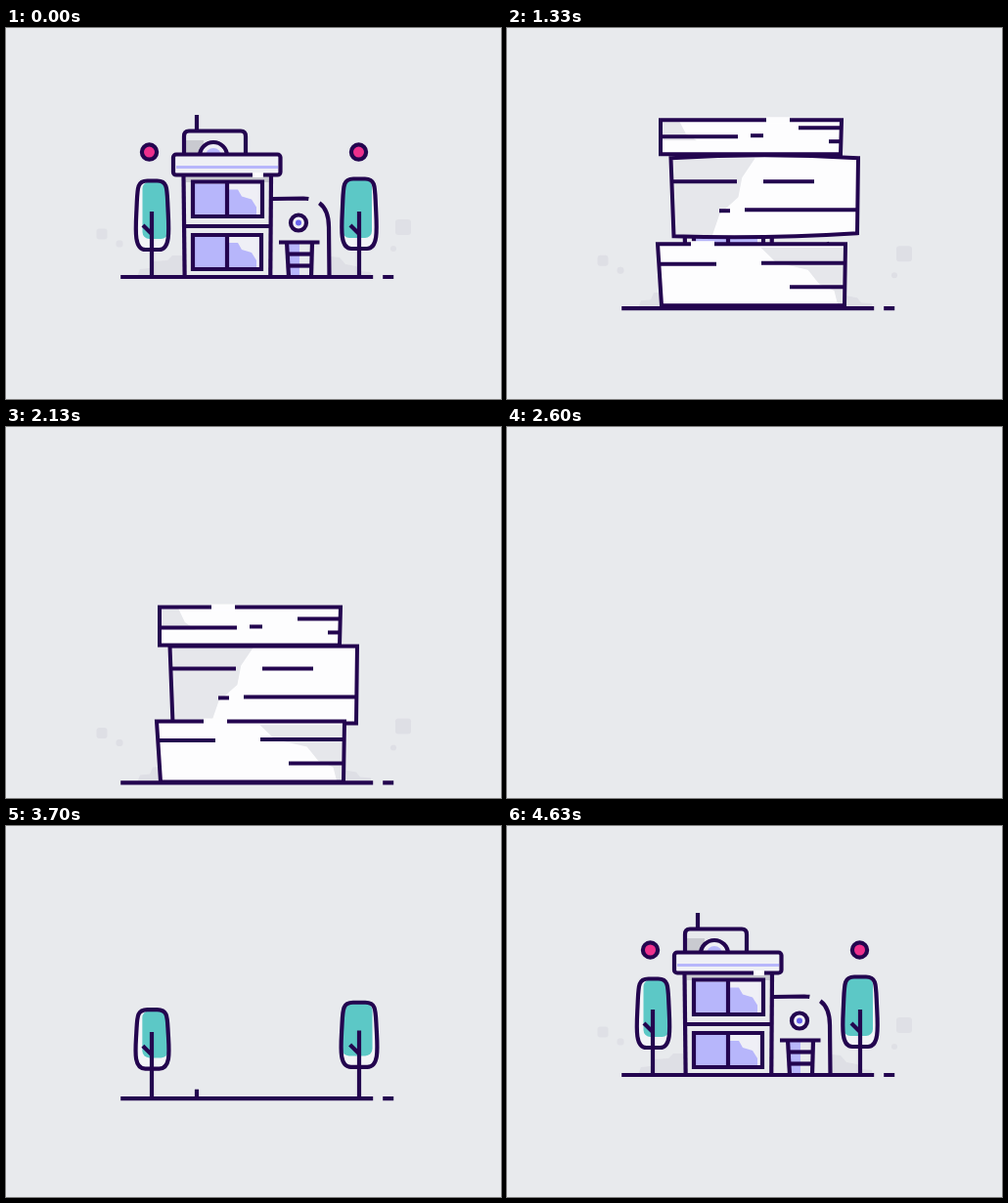
These frames come from a looping animation (506 px wide and 380 px high, 4660 ms). An HTML page with a canvas:

```html
<!DOCTYPE html>
<html lang="en">
<head>
<meta charset="utf-8">
<title>Little house loop</title>
<style>
  html, body { margin: 0; width: 100%; height: 100%; overflow: hidden; background: #e8eaed; }
  canvas { display: block; width: 100vw; height: 100vh; }
</style>
</head>
<body>
<canvas id="stage" width="506" height="380"></canvas>
<script>
const ctx = document.getElementById('stage').getContext('2d');
const LOOP = 4660, CYCLE_START = 2600, BASE = 255;
const BG = '#e8eaed', INK = '#23054f', TEAL = '#5cc8c6', PINK = '#ed2f8c',
      LILAC = '#b7b6fb', WHITE = '#fdfdfe', SHADE = '#e6e7eb', GREY = '#c9cad0', HAZE = '#dcdde4';

const clamp = p => Math.max(0, Math.min(1, p));
const mix = (a, b, p) => a + (b - a) * p;
const smooth = p => p * p * (3 - 2 * p);
const easeOut = p => 1 - (1 - p) ** 3;

// Interpolates [time, value] keys and holds both ends.
function track(time, keys, ease = smooth) {
  if (time <= keys[0][0]) return keys[0][1];
  for (let i = 1; i < keys.length; i++) {
    const [t0, a] = keys[i - 1], [t1, b] = keys[i];
    if (time < t1) return mix(a, b, ease((time - t0) / (t1 - t0)));
  }
  return keys[keys.length - 1][1];
}

function ink(width = 4.2) {
  ctx.strokeStyle = INK;
  ctx.lineWidth = width;
  ctx.stroke();
}

function fill(color) {
  ctx.fillStyle = color;
  ctx.fill();
}

function line(x0, y0, x1, y1, width) {
  ctx.beginPath();
  ctx.moveTo(x0, y0);
  ctx.lineTo(x1, y1);
  ink(width);
}

function rect(x, y, w, h, color) {
  ctx.fillStyle = color;
  ctx.fillRect(x, y, w, h);
}

function poly(points, color) {
  ctx.beginPath();
  points.forEach(([x, y]) => ctx.lineTo(x, y));
  ctx.closePath();
  fill(color);
}

function oval(x, y, rx, ry) {
  ctx.beginPath();
  ctx.ellipse(x, y, rx, ry, 0, 0, Math.PI * 2);
}

function shifted(dy, draw) {
  ctx.save();
  ctx.translate(0, dy);
  draw();
  ctx.restore();
}

function groundY(time) {
  if (time < LOOP) return track(time, [[3170, 278], [4170, 280], [4630, BASE]]);
  const t = time - LOOP;
  return BASE + 0.0242 * t + 57.5 * (Math.max(0, t - 1700) / 430) ** 3;
}

// The ground slides in from the right, turns a hairpin and runs out flat.
function drawGround(time, y) {
  if (time < 2650) return;
  const head = track(time, [[2650, 0], [3170, 642], [3500, 726]]);
  const gap = track(time, [[2650, -74], [3170, 568], [3500, 705]]);
  const tail = track(time, [[2850, 0], [3170, 375], [3500, 447]]);
  ctx.beginPath();
  ctx.moveTo(520, y + 25.5);
  ctx.lineTo(115, y + 25.5);
  ctx.arc(115, y + 12.75, 12.75, Math.PI / 2, Math.PI * 1.5);
  ctx.lineTo(420, y);
  const main = Math.max(0, gap - tail);
  const dash = Math.max(0, head - Math.max(0, gap + 10));
  ctx.setLineDash([0, tail, main, 10, dash, 2000]);
  ink();
  ctx.setLineDash([]);
}

function drawHaze(time) {
  ctx.globalAlpha = track(time, [[4170, 0], [4600, 0.8]]);
  const up = track(time, [[LOOP, 0], [LOOP + 2100, 7]]);
  const puffs = [[98, 211, 11], [116, 221, 7], [406, 204, 16], [396, 226, 6]];
  for (const [x, y, size] of puffs) {
    ctx.beginPath();
    ctx.roundRect(x - size / 2, y - size / 2 - up, size, size, 3);
    fill(HAZE);
  }
  poly([[134, 255], [137, 247], [147, 246], [150, 239], [165, 238], [170, 233], [181, 233], [181, 255]], HAZE);
  poly([[332, 255], [332, 234], [341, 235], [347, 242], [358, 244], [362, 249], [373, 250], [373, 255]], HAZE);
  ctx.globalAlpha = 1;
}

function drawWindow(y, width, height) {
  rect(191, y, width, height, '#efeff6');
  rect(192, y + 2, 33, height - 4, LILAC);
  poly([[228, y + 8], [237, y + 8], [241, y + 15], [251, y + 18],
        [256, y + 26], [256, y + height - 2], [228, y + height - 2]], LILAC);
  ctx.beginPath();
  ctx.rect(191, y, width, height);
  ink();
  line(226, y, 226, y + height);
}

function drawRoof(rise, time) {
  shifted(rise(0, -10), () => line(195, 89, 195, 106));
  shifted(rise(20, -6), () => {
    rect(184, 115, 18, 13, GREY);
    ctx.beginPath();
    ctx.arc(212, 131, 14, Math.PI, 0);
    fill('#ededf4');
    ink();
    ctx.beginPath();
    ctx.arc(212, 131, 8, Math.PI, 0);
    fill(LILAC);
    ctx.beginPath();
    ctx.moveTo(182, 131);
    ctx.lineTo(182, 111);
    ctx.quadraticCurveTo(182, 105.5, 187, 105.5);
    ctx.lineTo(240, 105.5);
    ctx.quadraticCurveTo(245, 105.5, 245, 111);
    ctx.lineTo(245, 131);
    ink();
  });
  shifted(rise(40, -2), () => {
    ctx.beginPath();
    ctx.roundRect(171, 129.5, 109.5, 21, 3);
    fill('#eff0f5');
    rect(174, 141, 104, 3, LILAC);
    ink();
    rect(track(time, [[4170, 243], [4630, 252]]), 148, 11, 5, WHITE);
  });
}

function drawAnnex(time) {
  const gapAt = track(time, [[4170, 104], [4630, 37], [LOOP + 800, 42], [LOOP + 1330, 48]]);
  const gapSize = track(time, [[4170, 40], [4630, 12]]);
  ctx.beginPath();
  ctx.moveTo(272, 175);
  ctx.lineTo(304, 174.5);
  ctx.quadraticCurveTo(330, 175, 330, 204);
  ctx.lineTo(330.5, 255);
  ctx.setLineDash([gapAt, gapSize, 500]);
  ink();
  ctx.setLineDash([]);

  oval(299, 199.5, 8, 8);
  fill('#f0f0f6');
  ink();
  oval(299, track(time, [[4170, 196], [4600, 199.5]]), 3, 3);
  fill('#6965ee');

  rect(289, 221, 11, 34, LILAC);
  line(279, 219.5, 320.5, 219.5);
  line(287, 219, 289, 255);
  line(313, 219, 312, 255);
  line(288, 231.5, 313, 231.5);
  line(288, 243.5, 313, 243.5);
}

function drawHouse(time) {
  if (time < 3680) return;
  const rise = (delay, late) => time < 4170
    ? track(time, [[3680 + delay, 180], [4170, late]], easeOut)
    : track(time, [[4170, late], [4520, 0]]);
  shifted(rise(60, 0), () => {
    rect(184, 152, 85, 6, GREY);
    line(181.5, 150, 183, 290);
    line(271, 150, 270, 290);
    drawWindow(157.5, 71, 35.5);
  });
  shifted(rise(60, 10), () => line(182, 203, 271, 203));
  shifted(rise(60, 17), () => drawWindow(212, 70, 35));
  shifted(rise(90, 0), () => drawAnnex(time));
  drawRoof(rise, time);
}

function drawTree(time, tree) {
  const { x, left, right, top, bottom, squash, inset, sprout } = tree;
  const size = track(time, [[sprout, 0.1], [sprout + 330, 1.1], [sprout + 560, 1],
                            [LOOP + 430, 1], [LOOP + 740, 0]]);
  if (time < sprout || size <= 0) return;
  const q = track(time, [[4170, 1], [4560, 0]]);
  const y0 = top + squash[0] * q, y1 = bottom - squash[1] * q, h = y1 - y0;
  // Scales the path only, so that strokes keep their weight.
  const sized = path => {
    ctx.save();
    ctx.translate(x, BASE);
    ctx.scale(size, size);
    ctx.beginPath();
    path();
    ctx.restore();
  };
  const canopy = () => {
    ctx.moveTo(left + 12, y0);
    ctx.lineTo(right - 12, y0);
    ctx.bezierCurveTo(right - 1, y0, right - 2, y0 + 8, right - 1, y0 + h * 0.4);
    ctx.bezierCurveTo(right, y0 + h * 0.7, right + 2, y1, right - 10, y1);
    ctx.lineTo(left + 10, y1);
    ctx.bezierCurveTo(left - 2, y1, left, y0 + h * 0.7, left + 1, y0 + h * 0.4);
    ctx.bezierCurveTo(left + 2, y0 + 8, left + 1, y0, left + 12, y0);
    ctx.closePath();
  };
  sized(canopy);
  fill('#f2f4f7');
  sized(() => ctx.roundRect(left + inset[0], y0 + 1, right - left - inset[0] - inset[1], h - 12, 7));
  fill(TEAL);
  sized(canopy);
  ink();
  sized(() => {
    ctx.moveTo(0, 0);
    ctx.lineTo(0, -67);
    ctx.moveTo(-9, -53);
    ctx.lineTo(0, -44);
  });
  ink();
}

// A seed drops in, its ring leading the filled core, and squashes on landing.
function drawSeed(time, x, start, sprout) {
  if (time < start || time >= sprout) return;
  const fallAt = t => -300 + 294 * clamp((t - start) / 290) ** 1.17;
  const landed = time >= start + 290;
  if (landed) {
    oval(x, BASE - 6, 6, 3);
    fill(TEAL);
    ctx.beginPath();
    ctx.roundRect(x - 7.5, BASE - 10, 15, 7.5, 4);
  } else {
    oval(x, BASE + fallAt(time - 24), 7, 8);
    fill(TEAL);
    oval(x, BASE + fallAt(time), 6, 10);
  }
  ink();
}

function drawBerry(time, x, peak, late) {
  const heightAt = t => track(t, [[3700 + peak, -80], [3900 + peak, -203], [4170, late], [4400, -130], [4600, -128]])
    + 53 * (Math.max(0, t - LOOP - 600) / 200) ** 2;
  if (time < 3700 + peak) return;
  oval(x, BASE + heightAt(time - (time > LOOP + 600 ? 18 : 0)), 7, 7);
  fill(PINK);
  oval(x, BASE + heightAt(time), 7.6, 7.6);
  ink();
}

// Canopy edges are measured from the foot of the trunk.
const trees = [
  { x: 149, left: -16.5, right: 17.5, top: -98.5, bottom: -28, squash: [9, 2], inset: [7, 1], sprout: 3200 },
  { x: 361, left: -18, right: 18, top: -100.5, bottom: -29, squash: [6, 2], inset: [1, 5], sprout: 3420 }
];

// Pairs hold the loose and the pressed value; marks are [x0, x1, offset from the bottom].
const sheets = [
  { land: 1310, edges: [157, 342, 341, 157], bottom: [-158, -141], height: [35, 39], bow: 0, gap: [265, 210],
    marks: [[158, 236, -18], [249, 262, -19], [298, 341, -27], [329, 341, -13]],
    shade: [[0, 0], [0.1, 0], [0.14, 0.4], [0.2, 0.6], [0, 0.6]] },
  { land: 1130, edges: [167.5, 359, 358, 170.5], bottom: [-74, -61], height: [80, 79], bow: 3, gap: null,
    marks: [[169, 235, -56], [262, 314, -56], [217, 228, -26], [243, 358, -27]],
    shade: [[0, 0], [0.45, 0], [0.38, 0.25], [0.36, 0.5], [0.26, 0.72], [0.22, 1], [0, 1]] },
  { land: 940, edges: [154, 346, 345, 158], bottom: [-3, -1], height: [63, 62], bow: 0, gap: [188, 202],
    marks: [[156, 214, -42.5], [260, 346, -43.5], [289, 345, -19]],
    shade: [[1, 0.06], [0.55, 0.06], [0.63, 0.3], [0.8, 0.42], [0.86, 0.65], [0.94, 0.76], [0.96, 1], [1, 1]] }
];

function drawSheet(t, ground, sheet) {
  const start = sheet.land - 260;
  if (t < start) return;
  const press = clamp((t - 1650) / 480) ** 2;
  const p = clamp((t - start) / 260);
  const stretch = p < 1 ? 1.35 : 1;
  const y1 = ground + mix(...sheet.bottom, press) - 330 * (1 - p ** 1.5);
  const y0 = y1 - mix(...sheet.height, press) * stretch;
  const bow = sheet.bow * (1 - press);
  const [tl, tr, br, bl] = sheet.edges;
  const mid = (tl + tr) / 2;

  ctx.beginPath();
  ctx.moveTo(tl, y0);
  ctx.quadraticCurveTo(mid, y0 - bow * 2, tr, y0);
  ctx.lineTo(br, y1 - bow);
  ctx.quadraticCurveTo(mid, y1 + bow, bl, y1);
  ctx.closePath();
  fill(WHITE);
  // Shade goes under the outline, kept inside the sheet.
  ctx.save();
  ctx.clip();
  const outline = new Path2D();
  outline.moveTo(tl, y0);
  outline.quadraticCurveTo(mid, y0 - bow * 2, tr, y0);
  outline.lineTo(br, y1 - bow);
  outline.quadraticCurveTo(mid, y1 + bow, bl, y1);
  outline.closePath();
  poly(sheet.shade.map(([u, v]) => [mix(tl, tr, u), mix(y0, y1, v)]), SHADE);
  ctx.restore();
  ctx.strokeStyle = INK;
  ctx.lineWidth = 4;
  ctx.stroke(outline);

  if (sheet.gap) rect(mix(...sheet.gap, press), y0 - 3, 24, 6, WHITE);
  for (const [x0, x1, dy] of sheet.marks) line(x0, y1 + dy * stretch, x1, y1 + dy * stretch, 4);
}

function draw(now) {
  const clock = now % LOOP;
  // The cycle begins on the empty stage, so early times belong to its second half.
  const time = clock < CYCLE_START ? clock + LOOP : clock;
  const ground = groundY(time);

  rect(0, 0, 506, 380, BG);
  ctx.save();
  ctx.translate(0, ground - BASE);
  ctx.beginPath();
  ctx.rect(0, -700, 506, 700 + BASE);
  ctx.clip();
  drawHaze(time);
  drawSeed(time, 146.5, 2850, 3200);
  drawSeed(time, 360.5, 3090, 3420);
  drawBerry(time, 146.5, 0, -117);
  drawBerry(time, 360.5, 30, -122);
  trees.forEach(tree => drawTree(time, tree));
  drawHouse(time);
  ctx.restore();

  sheets.forEach(sheet => drawSheet(time - LOOP, ground, sheet));
  drawGround(time, ground);
}

const origin = performance.now();
function tick() {
  draw(performance.now() - origin);
  requestAnimationFrame(tick);
}
tick();
</script>
</body>
</html>
```
